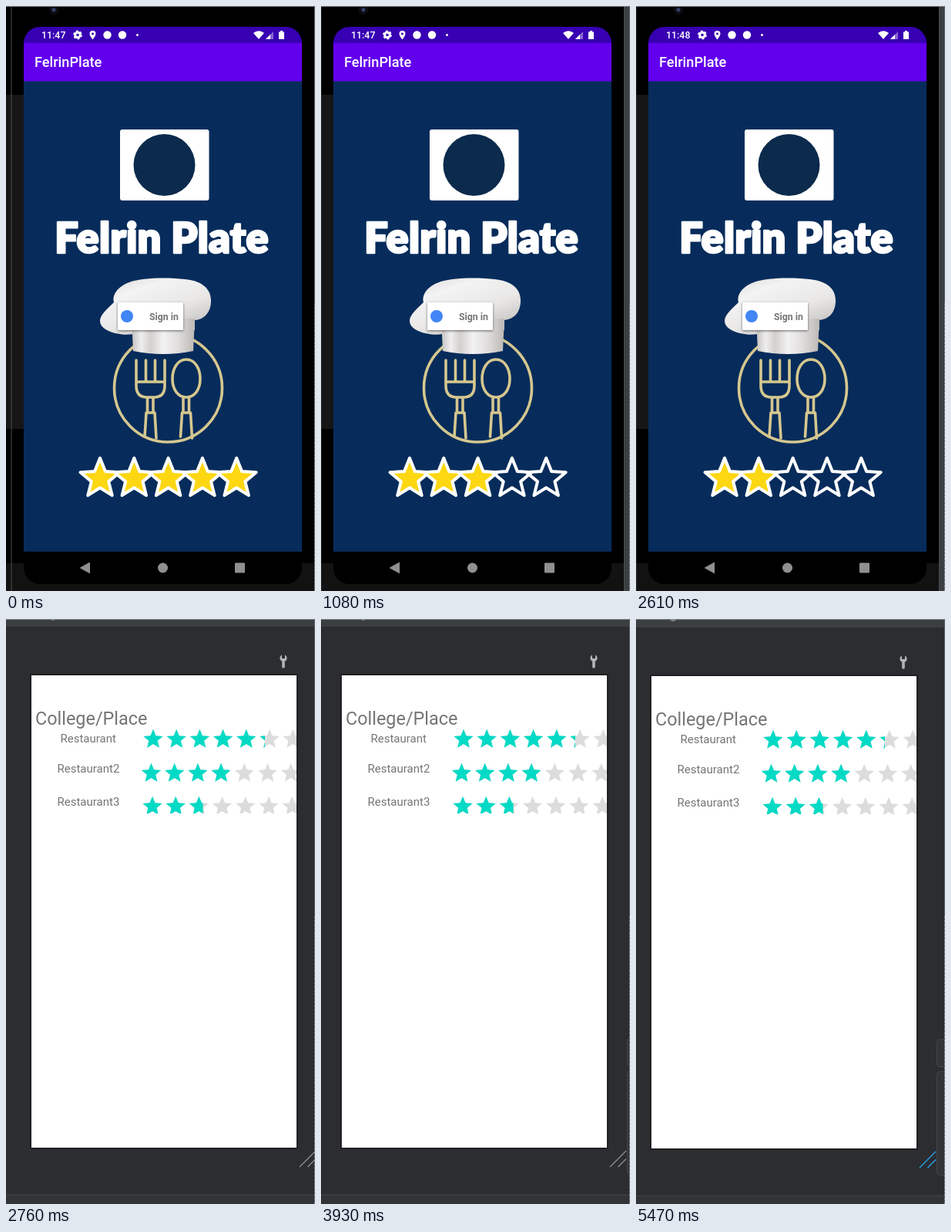
Recreate the animation shown at these times as an HTML page. Size 401 by 758 pixels, loop 8.09 s.

```html
<!DOCTYPE html>
<html lang="en">
<head>
<meta charset="utf-8">
<title>Restaurant app demo</title>
<style>
  html, body { margin: 0; width: 100%; height: 100%; overflow: hidden; background: #000; }
  svg { display: block; width: 401px; height: 758px; }
  text { font-family: Roboto, sans-serif; }
  .app { fill: #fff; font-weight: 500; }
  .brand { font: 900 54px Lato, sans-serif; fill: #fff; stroke: #fff; stroke-width: 2.500; stroke-linejoin: round; text-anchor: middle; letter-spacing: .2px; }
  .label { fill: #757575; }
  .cutlery { fill: none; stroke: #d5c78f; stroke-width: 3.600; stroke-linecap: round; stroke-linejoin: round; }
  .shade { filter: drop-shadow(0 1px 1.5px rgba(0, 0, 0, .55)); }
</style>
</head>
<body>
<svg viewBox="0 0 401 758">
  <defs>
    <linearGradient id="puff" x2=".7" y2="1">
      <stop offset="0" stop-color="#d9d7d6"/><stop offset=".3" stop-color="#f4f3f3"/>
      <stop offset=".65" stop-color="#e9e8e7"/><stop offset="1" stop-color="#c5c2c0"/>
    </linearGradient>
    <linearGradient id="band">
      <stop offset="0" stop-color="#c4c1bf"/><stop offset=".15" stop-color="#efeeee"/>
      <stop offset=".3" stop-color="#d3d0ce"/><stop offset=".5" stop-color="#f3f2f2"/>
      <stop offset=".75" stop-color="#dedcdb"/><stop offset="1" stop-color="#bbb8b5"/>
    </linearGradient>
    <clipPath id="pageClip"><rect x="33" y="73" width="344" height="612"/></clipPath>
  </defs>

  <g id="phone">
    <rect x="-10" width="430" height="758"/>
    <rect x="-10" y="115" width="33" height="433" fill="#161616"/>
    <rect x="-10" y="722" width="410" height="36" fill="#121212"/>
    <rect x="400" width="20" height="758" fill="#3c3f41"/>
    <path d="M7 0V758M400.500 0V758" stroke="#4a4c4e" fill="none"/>
    <circle cx="62" cy="5" r="6.500" fill="#0b0c10"/>
    <circle cx="62" cy="5" r="2.500" fill="#34406b"/>
    <rect x="23" y="27" width="361" height="722" rx="21"/>
    <path d="M23 48A21 21 0 0 1 44 27H363A21 21 0 0 1 384 48Z" fill="#3700b3"/>
    <rect x="23" y="48" width="361" height="50" fill="#6200ee"/>
    <rect x="23" y="97.500" width="361" height="609.500" fill="#072c5b"/>

    <text id="clock" class="app" x="46" y="42" font-size="12.400"></text>
    <g fill="#fff">
      <circle cx="93" cy="37.500" r="3.300" fill="none" stroke="#fff" stroke-width="3"/>
      <circle cx="93" cy="37.500" r="5.100" fill="none" stroke="#fff" stroke-width="1.600" stroke-dasharray="2.700 2.640"/>
      <path fill-rule="evenodd" d="M112.500 43.500C110 40 108.500 38 108.500 36a4 4 0 0 1 8 0C116.500 38 115 40 112.500 43.500ZM112.500 34.500a1.500 1.500 0 1 0 .01 0Z"/>
      <circle cx="131.500" cy="37.500" r="5.200"/>
      <circle cx="151" cy="37.500" r="5.200"/>
      <circle cx="170.500" cy="37.500" r="1.500"/>
      <path d="M321 35Q328 29.500 335 35L328 43Z"/>
      <path d="M337 43L347 33V43Z" opacity=".4"/>
      <path d="M337 43L343 37V43Z"/>
      <path d="M354 33.500H356V32H359V33.500H361V43H354Z"/>
    </g>
    <text class="app" x="37" y="79" font-size="18.200">FelrinPlate</text>

    <rect x="148" y="160" width="115.500" height="92" rx="3" fill="#fff"/>
    <circle cx="205.500" cy="206" r="40" fill="#0b2a4c"/>
    <text class="brand" x="202" y="319.500">Felrin Plate</text>

    <g class="cutlery">
      <circle cx="210.500" cy="495" r="70"/>
      <path d="M169 459V492Q169 507 183 507H192Q206 507 206 492V459M181.500 459V487M193.500 459V487M169 487H206"/>
      <path id="grip" d="M183.500 508V526M191 508V526M182 527H193L195 560M182 527L180 558"/>
      <use href="#grip" x="46.500"/>
      <path d="M234 458C246 458 252 471 252 483C252 498 244 507 234 507S216 498 216 483C216 471 222 458 234 458Z"/>
    </g>
    <path d="M165 425C150 428 122 422 122 408C122 400 132 392 140 384C137 374 146 363 160 358C178 351 215 352 232 354C254 356 267 366 266 384C265 399 256 406 245 407V420Z" fill="url(#puff)"/>
    <path d="M163 405H245L243 447Q204 455 165 447Z" fill="url(#band)"/>
    <rect class="shade" x="145" y="384" width="85" height="36" rx="1" fill="#fff"/>
    <circle cx="157" cy="402" r="8" fill="#4285f4"/>
    <text class="label" x="186" y="407" font-size="12.300" font-weight="700">Sign in</text>

    <g id="rating" stroke="#fff" stroke-width="4" stroke-linejoin="round"></g>

    <g fill="#909090">
      <path d="M95.500 728L109 720.500V735.500Z"/>
      <circle cx="203.500" cy="728" r="6.500"/>
      <rect x="297" y="721.500" width="13" height="13" rx="1"/>
    </g>
  </g>

  <g id="editor">
    <rect x="-10" y="-4" width="440" height="770" fill="#2b2d30"/>
    <rect x="-10" y="-4" width="440" height="14" fill="#3c3f41"/>
    <path d="M-10 746.500H430" stroke="#3c3e41" stroke-width="2"/>
    <rect x="-10" y="748" width="440" height="20" fill="#323336"/>
    <circle cx="61" cy="-3" r="5" fill="#8c8e90"/>
    <path d="M360 53V62" stroke="#b2b4b6" stroke-width="3.600" stroke-linecap="round"/>
    <path d="M358 46.500A4.600 4.600 0 1 0 362 46.500V51H358Z" fill="#b2b4b6"/>
    <rect x="31" y="71" width="348" height="616" rx="2" fill="#1f1f21"/>
    <rect x="33" y="73" width="344" height="612" fill="#fff"/>
    <g class="label">
      <text x="38" y="137" font-size="23.400">College/Place</text>
      <g font-size="15">
        <text x="70.500" y="160">Restaurant</text>
        <text x="66.500" y="199">Restaurant2</text>
        <text x="66.500" y="242">Restaurant3</text>
      </g>
    </g>
    <g id="rows" clip-path="url(#pageClip)"></g>
    <g fill="#323437" stroke="#44474a">
      <rect x="403.500" y="543.500" width="30" height="36" rx="4"/>
      <rect x="403.500" y="585.500" width="30" height="134" rx="4"/>
    </g>
    <path id="handle" d="M381 710L402 689M391.500 710L402 699.500" fill="none" stroke-width="1.300"/>
  </g>

  <path d="M0 .5H401" stroke="#85878a"/>
  <path d="M400.500 0V758" stroke="#65686a"/>
  <path d="M400.500 385V758" stroke="#8d8f92" stroke-dasharray="3 2"/>
</svg>
<script>
const LOOP = 8090;
const EDITOR_AT = 2760;

// [start ms, value]
const phoneX = [[0, 0], [270, -4], [420, -7]];
const stars = [[0, 5], [540, 0], [690, 1], [810, 2], [1080, 3], [1200, 4], [1470, 5], [2310, 0], [2460, 1], [2610, 2]];
const clockText = [[0, '11:47'], [2310, '11:48']];
const editorPos = [[0, '0 0'], [3930, '-6 0'], [4080, '-10 0'], [4330, '-13 1']];
const handleColor = [[0, '#8d8f91'], [5350, '#2aa5f0']];

const $ = id => document.getElementById(id);
const at = (steps, t) => steps.filter(([start]) => start <= t).pop()[1];

function add(parent, tag, attrs) {
  const el = document.createElementNS('http://www.w3.org/2000/svg', tag);
  for (const name in attrs) el.setAttribute(name, attrs[name]);
  return parent.appendChild(el);
}

function starPath(cx, cy, r, ratio) {
  const points = Array.from({ length: 10 }, (_, i) => {
    const a = i * Math.PI / 5, d = i % 2 ? r * ratio : r;
    return `${(cx + d * Math.sin(a)).toFixed(2)} ${(cy - d * Math.cos(a)).toFixed(2)}`;
  });
  return `M${points.join('L')}Z`;
}

const bigStars = Array.from({ length: 5 }, (_, i) =>
  add($('rating'), 'path', { d: starPath(122 + i * 44.3, 612.5, 26.8, .44) }));

// first centre x, centre y, right end of the teal part, bottom edge
[[191, 156, 336, 168], [188.5, 200, 290.5, 211], [190, 243, 255.5, 252]].forEach(([x, y, end, bottom], row) => {
  const d = Array.from({ length: 7 }, (_, i) => starPath(x + i * 30.2, y, 13.3, .45)).join('');
  [['#dcdcdc', 400], ['#03dac5', end]].forEach(([fill, right], layer) => {
    const id = `row${row}${layer}`;
    const clip = add($('rows'), 'clipPath', { id });
    add(clip, 'rect', { x: 0, y: 0, width: right, height: bottom });
    add($('rows'), 'path', { d, fill, 'clip-path': `url(#${id})` });
  });
});

function draw(t) {
  const editing = t >= EDITOR_AT;
  $('phone').style.display = editing ? 'none' : '';
  $('editor').style.display = editing ? '' : 'none';
  $('phone').setAttribute('transform', `translate(${at(phoneX, t)})`);
  $('editor').setAttribute('transform', `translate(${at(editorPos, t)})`);
  $('clock').textContent = at(clockText, t);
  $('handle').setAttribute('stroke', at(handleColor, t));
  const lit = at(stars, t);
  bigStars.forEach((star, i) => star.setAttribute('fill', i < lit ? '#fcd712' : 'none'));
}

const begin = performance.now();
function tick() {
  draw((performance.now() - begin) % LOOP);
  requestAnimationFrame(tick);
}
tick();
</script>
</body>
</html>
```
